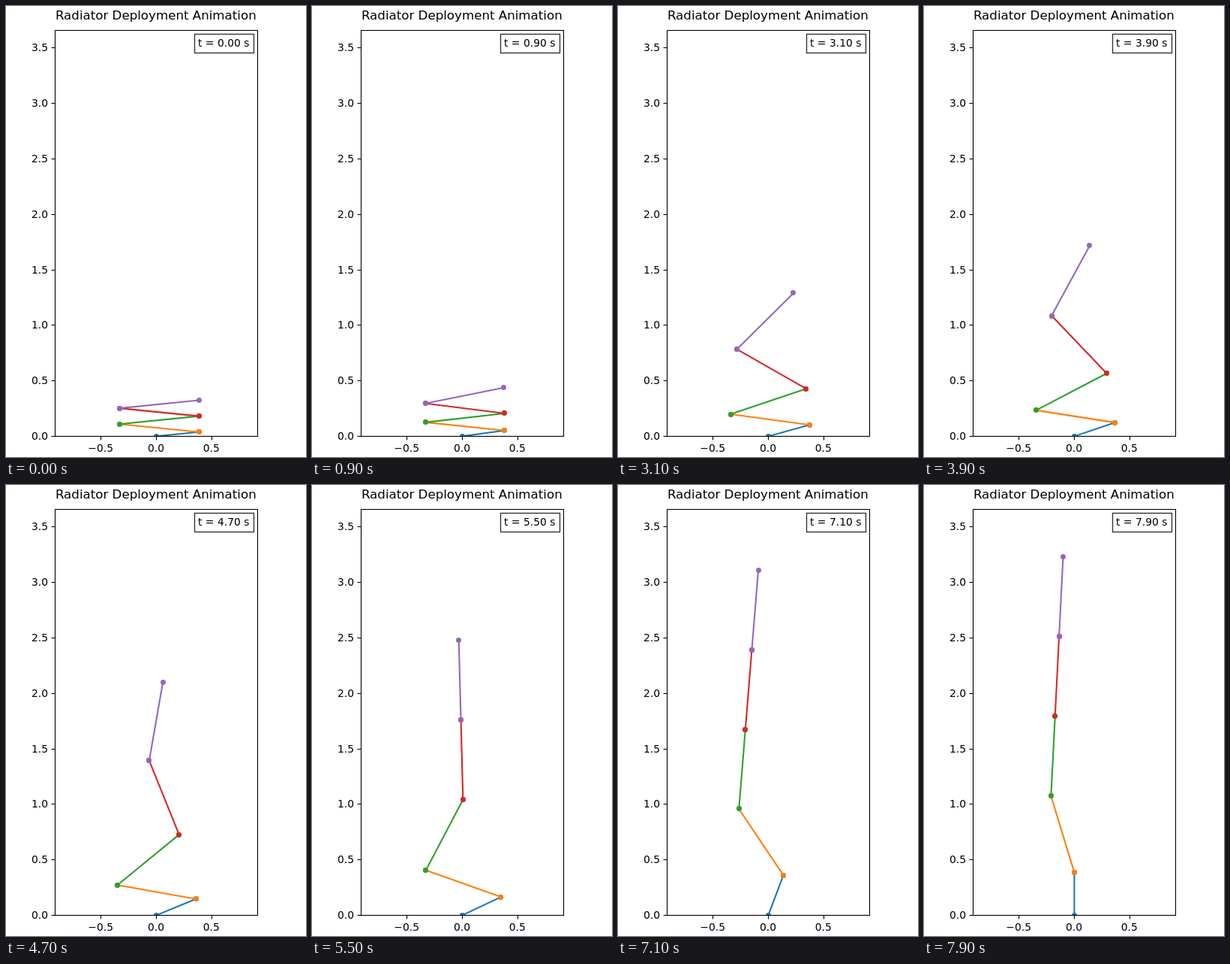
An HTML page with a canvas for the animation above (8 s loop, 400x600 px).

```html
<!DOCTYPE html>
<html>
<head>
<meta charset="utf-8">
<style>
  html, body { margin: 0; height: 100%; overflow: hidden; background: #fff; }
  canvas { display: block; }
</style>
</head>
<body>
<canvas id="stage" width="400" height="600"></canvas>
<script>
const ctx = document.getElementById('stage').getContext('2d');
const LOOP = 8000, STEP = 100;
const X0 = 200.4, Y0 = 572.4, UNIT = 147.6;
const ROOT_LENGTH = 57, PANEL_LENGTH = 106.2;
const COLORS = ['#1f77b4', '#ff7f0e', '#2ca02c', '#d62728', '#9467bd'];

// The panels start folded in a zigzag. Each phase eases every link to a new
// heading (degrees) by a power curve; the last entry also steers the links locked to it.
const FOLDED = [5.7, 174.3, 5.7, 174.3, 5.7];
const PHASES = [
  { end: 5.25, pose: [24.8, 169, 49, 94, 94], power: [1.3, 1.8, 2.3, 2.3, 1.55] },
  { end: 6.3, pose: [33, 140.9, 83.6], power: [2, 0.83, 0.67, 1, 1] },
  { end: 7.9, pose: [90, 107, 87.1], power: [0.65, 1, 1] }
];

const pick = (list, i) => list[Math.min(i, list.length - 1)];

function heading(link, t) {
  let start = 0, from = FOLDED;
  for (const { end, pose, power } of PHASES) {
    if (t <= end) {
      const p = ((t - start) / (end - start)) ** pick(power, link);
      const a = pick(from, link), b = pick(pose, link);
      return (a + (b - a) * p) * Math.PI / 180;
    }
    start = end;
    from = pose;
  }
}

function text(str, x, y, align, size = 13.89) {
  ctx.font = size + 'px "DejaVu Sans", sans-serif';
  ctx.textAlign = align;
  ctx.fillStyle = '#000';
  ctx.fillText(str, x, y);
}

function line(x1, y1, x2, y2) {
  ctx.beginPath();
  ctx.moveTo(x1, y1);
  ctx.lineTo(x2, y2);
  ctx.stroke();
}

// Dots sit on pixel centres.
function dot(x, y) {
  ctx.beginPath();
  ctx.arc(Math.floor(x) + 0.5, Math.floor(y) + 0.5, 3.45, 0, 2 * Math.PI);
  ctx.fill();
}

function drawLinks(t) {
  let x = X0, y = Y0;
  ctx.save();
  ctx.beginPath();
  ctx.rect(65, 32, 270, 540);
  ctx.clip();
  ctx.lineWidth = 2.08;
  COLORS.forEach((color, i) => {
    const a = heading(i, t), len = i ? PANEL_LENGTH : ROOT_LENGTH;
    const nx = x + len * Math.cos(a), ny = y - len * Math.sin(a);
    ctx.strokeStyle = ctx.fillStyle = color;
    line(x, y, nx, ny);
    dot(x, y);
    dot(nx, ny);
    x = nx;
    y = ny;
  });
  ctx.restore();
}

function drawAxes() {
  ctx.strokeStyle = '#000';
  ctx.lineWidth = 1.11;
  ctx.strokeRect(65.5, 32.5, 270, 540);
  for (let k = 0; k < 8; k++) {
    const y = Math.round(572 - k * UNIT / 2) + 0.5;
    line(60.5, y, 65.5, y);
    text((k / 2).toFixed(1), 56, y + 4.5, 'right');
  }
  ['\u22120.5', '0.0', '0.5'].forEach((label, i) => {
    const x = 200 + (i - 1) * UNIT / 2, tick = Math.round(x) + 0.5;
    line(tick, 572.5, tick, 577.5);
    text(label, x, 593, 'center');
  });
  text('Radiator Deployment Animation', 199.8, 18, 'center', 16.67);
}

function drawClock(t) {
  ctx.fillStyle = 'rgba(255,255,255,.8)';
  ctx.strokeStyle = 'rgba(0,0,0,.8)';
  ctx.lineWidth = 1.39;
  ctx.fillRect(251.5, 37.5, 79, 25);
  ctx.strokeRect(251.5, 37.5, 79, 25);
  text('t = ' + t.toFixed(2) + ' s', 256, 54, 'left');
}

function frame() {
  const t = Math.floor(performance.now() % LOOP / STEP) * STEP / 1000;
  ctx.fillStyle = '#fff';
  ctx.fillRect(0, 0, 400, 600);
  drawLinks(t);
  drawAxes();
  drawClock(t);
  requestAnimationFrame(frame);
}
frame();
</script>
</body>
</html>
```
